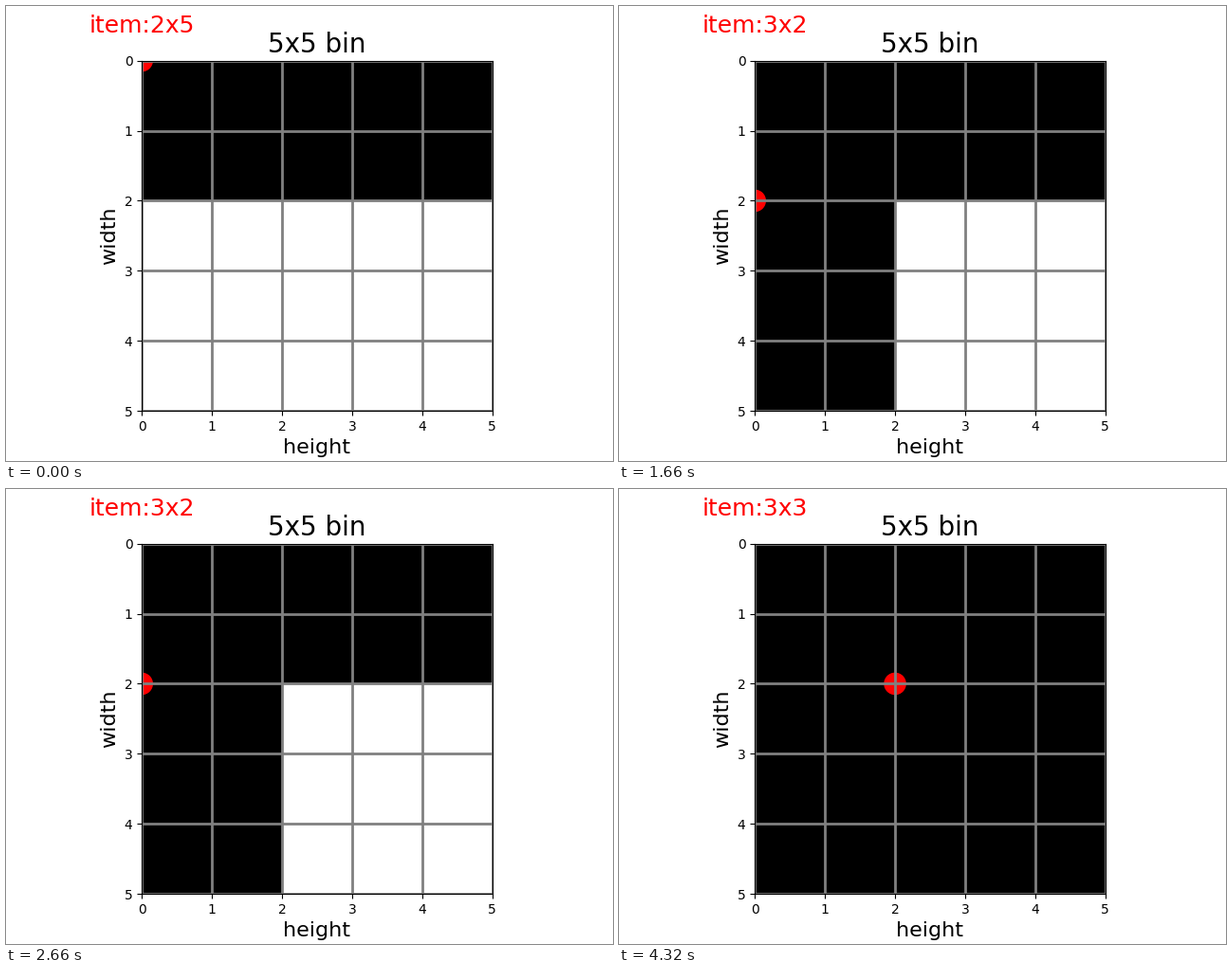
Animation, 640 px wide and 480 px high, one loop 4980 ms. Source, as a matplotlib script:

```python
import matplotlib.pyplot as plt
import numpy as np
from matplotlib.animation import FuncAnimation
from matplotlib.patches import Circle

SIZE = 5
# (row, column, height, width) of each packed item
ITEMS = [(0, 0, 2, 5), (2, 0, 3, 2), (2, 2, 3, 3)]

fig, ax = plt.subplots(figsize=(6.4, 4.8), dpi=100)
image = ax.imshow(np.zeros((SIZE, SIZE)), cmap="Greys", vmin=0, vmax=1,
                  extent=(0, SIZE, SIZE, 0), interpolation="nearest")
corner = ax.add_patch(Circle((0, 0), 0.15, color="red"))
label = ax.text(0, -0.5, "", color="red", fontsize=18, ha="center", va="center")

ax.set_xticks(range(SIZE + 1))
ax.set_yticks(range(SIZE + 1))
ax.grid(color="gray", linewidth=2)
ax.set_title("5x5 bin", fontsize=20)
ax.set_xlabel("height", fontsize=16)
ax.set_ylabel("width", fontsize=16)


def update(step):
    cells = np.zeros((SIZE, SIZE))
    for row, col, h, w in ITEMS[:step + 1]:
        cells[row:row + h, col:col + w] = 1
    image.set_data(cells)
    row, col, h, w = ITEMS[step]
    corner.center = (col, row)
    label.set_text(f"item:{h}x{w}")
    return image, corner, label


anim = FuncAnimation(fig, update, frames=len(ITEMS), interval=1660, repeat=True)
plt.show()
```
